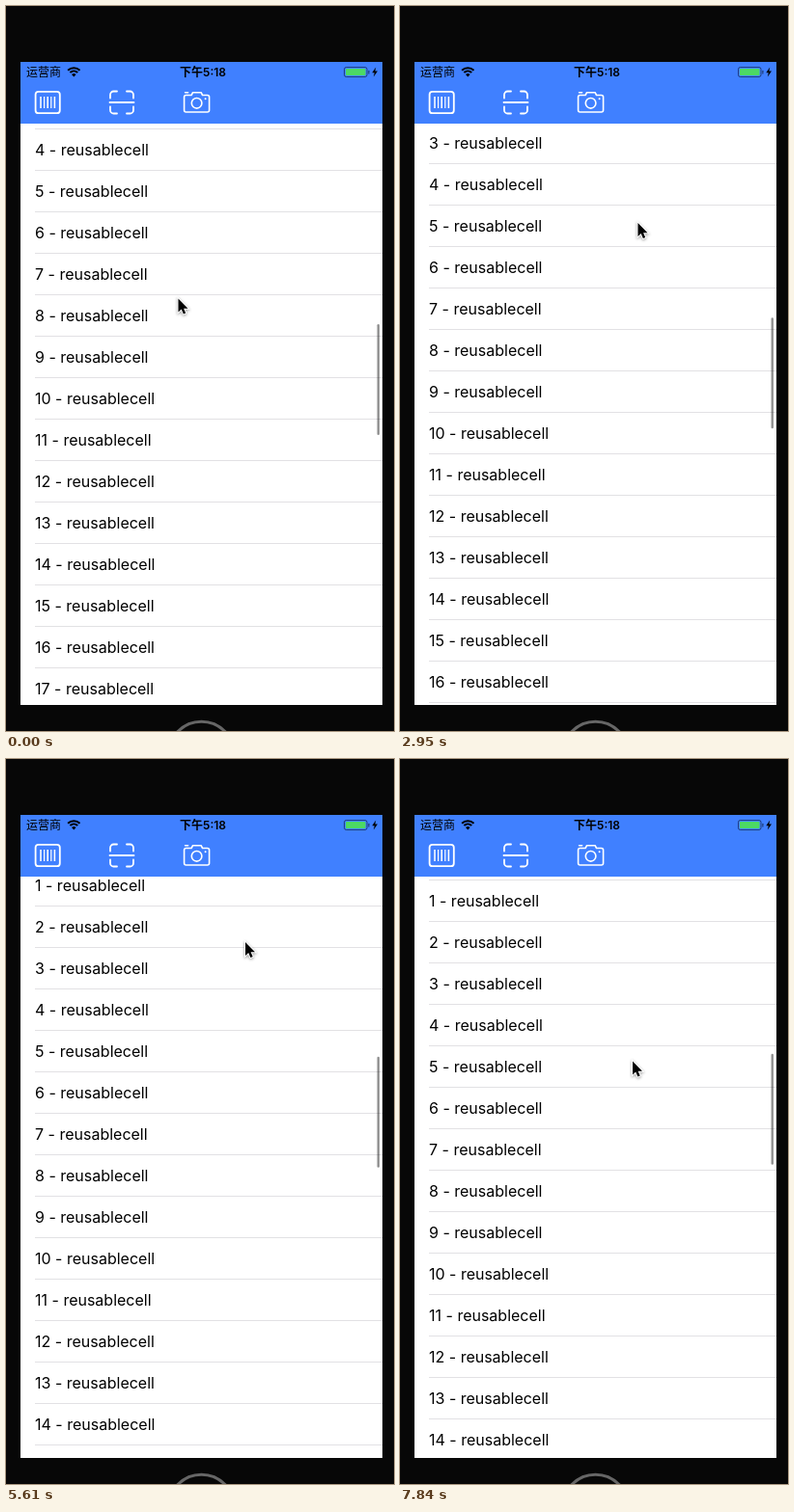
Write an HTML page with a canvas that moves like this. It is 402 px wide and 752 px high and loops after 7990 ms.

```html
<!DOCTYPE html>
<html lang="zh">
<head>
<meta charset="utf-8">
<title>Collapsing header</title>
<style>
html, body { margin: 0; width: 100%; height: 100%; overflow: hidden; background: #070707; }
canvas { display: block; width: 402px; height: 752px; }
</style>
</head>
<body>
<canvas id="stage"></canvas>
<script>
const W = 402, H = 752, LOOP = 7990;
const LEFT = 15, RIGHT = 390, TOP = 58, BOTTOM = 725;
const WIDTH = RIGHT - LEFT, NAV = 122, HEADER = 217, ROW = 43;
const BLUE = '#4080ff';
const CJK = '"Noto Sans CJK SC", "Noto Sans CJK", sans-serif';
const LATIN = 'Inter, sans-serif';

// step, scroll offset, pointer x, pointer y
const KEYS = [
  [0, 261, 178.5, 303.5], [4, 76, 204, 328], [7, 95, 218.5, 338],
  [9, 95, 218.5, 338], [10, 36, 217.5, 405], [11, 36, 217.5, 405],
  [13, 0, 216.5, 486], [14, 0, 216.5, 488], [20, 225.5, 246.5, 225],
  [22, 288, 250, 165], [27, 112, 257, 342], [30, 0, 260, 420],
  [33, 0, 258, 309], [34, 0, 258, 309], [38, 150, 248, 190],
  [40, 165, 245, 192], [44, 42.5, 243.3, 351], [46, 0, 242, 425],
  [48, 0, 242, 444], [53, 134.5, 241, 313.5]
];
// steps between which the scrollbar stays hidden
const RESTS = [[7, 9], [14, 14], [33, 34], [48, 48]];

const canvas = document.getElementById('stage');
const dpr = window.devicePixelRatio || 1;
canvas.width = W * dpr;
canvas.height = H * dpr;
const g = canvas.getContext('2d');
const clamp = v => Math.max(0, Math.min(1, v));

function stepAt(t) {
  return Math.min(53, Math.floor((t + 11) / (147 + t * .000116)));
}

function poseAt(step) {
  let i = 1;
  while (i < KEYS.length - 1 && KEYS[i][0] < step) i++;
  const a = KEYS[i - 1], b = KEYS[i];
  const k = clamp((step - a[0]) / (b[0] - a[0]));
  const [, scroll, x, y] = a.map((v, n) => v + (b[n] - v) * k);
  const bar = RESTS.reduce((v, [from, to]) =>
    step > to ? v : Math.min(v, clamp((from - step) * .45)), 1);
  return { scroll, x, y, bar };
}

function rect(x, y, w, h, color) {
  g.fillStyle = color;
  g.fillRect(x, y, w, h);
}

function text(str, x, y, font, color, align = 'left') {
  g.font = font;
  g.fillStyle = color;
  g.textAlign = align;
  g.fillText(str, x, y);
}

function path(...pts) {
  g.beginPath();
  for (let i = 0; i < pts.length; i += 2) g.lineTo(pts[i], pts[i + 1]);
}

function line(...pts) {
  path(...pts);
  g.stroke();
}

function box(x, y, w, h, r, fill) {
  g.beginPath();
  g.roundRect(x, y, w, h, r);
  fill ? g.fill() : g.stroke();
}

function ring(x, y, r, from = 0, to = Math.PI * 2) {
  g.beginPath();
  g.arc(x, y, r, from, to);
  g.stroke();
}

function dot(x, y, r) {
  g.beginPath();
  g.arc(x, y, r, 0, Math.PI * 2);
  g.fill();
}

function clipped(y, h, draw) {
  if (h <= 0) return;
  g.save();
  g.beginPath();
  g.rect(LEFT, y, WIDTH, h);
  g.clip();
  draw();
  g.restore();
}

function at(x, y, draw) {
  g.save();
  g.translate(x, y);
  draw();
  g.restore();
}

function whitePen(width) {
  g.strokeStyle = g.fillStyle = '#fff';
  g.lineWidth = width;
  g.lineCap = g.lineJoin = 'round';
}

function scanIcon(w, h, arm, r, pen) {
  whitePen(pen);
  for (const sx of [-1, 1]) for (const sy of [-1, 1]) {
    g.beginPath();
    g.moveTo(sx * w, sy * (h - arm));
    g.arcTo(sx * w, sy * h, sx * (w - arm), sy * h, r);
    g.lineTo(sx * (w - arm), sy * h);
    g.stroke();
  }
  line(-w - .5, 0, w + .5, 0);
}

function barcodeIcon(w, h, r, pen, gap, bar) {
  whitePen(pen);
  box(-w, -h, w * 2, h * 2, r);
  g.lineCap = 'butt';
  for (let i = -2; i <= 2; i++) {
    g.lineWidth = pen * (i % 2 ? .65 : .85);
    line(i * gap, -bar, i * gap, bar);
  }
}

function cameraIcon() {
  const w = 13, top = -7.5, low = 10, r = 2;
  whitePen(1.6);
  path(-w + r, top, -5.5, top, -4, -10.3, 4.5, -10.3, 6, top);
  g.arcTo(w, top, w, low, r);
  g.arcTo(w, low, -w, low, r);
  g.arcTo(-w, low, -w, top, r);
  g.arcTo(-w, top, w, top, r);
  g.closePath();
  g.stroke();
  ring(0, .8, 5.3);
  line(-12, -10.3, -9, -10.3);
  dot(9, -3.7, 1);
}

function cardIcon() {
  whitePen(2.2);
  box(-17, -16, 34, 32, 3.5);
  line(-17, -6.2, 17, -6.2);
  line(-17, 2.5, -6, 2.5, -3.5, 5.5, 3.5, 5.5, 6, 2.5, 17, 2.5);
}

function locateIcon() {
  whitePen(2.3);
  ring(0, 0, 16.3, Math.PI * 1.22, Math.PI * 2.83);
  ring(-.5, .3, 6.3);
  dot(-15.6, .2, 2.4);
}

function billIcon() {
  whitePen(1.6);
  box(31, 89, 18, 18, 1.5);
  for (let i = 0; i < 3; i++) line(34.5, 94 + i * 4, i < 2 ? 45.5 : 41, 94 + i * 4);
}

function wifi() {
  const up = -Math.PI / 2, spread = .76;
  g.strokeStyle = g.fillStyle = '#000';
  g.lineCap = 'butt';
  g.lineWidth = 2;
  for (const r of [9, 5.7]) ring(70.3, 73.2, r, up - spread, up + spread);
  path(70.3, 73.6);
  g.arc(70.3, 73.4, 3.3, up - spread, up + spread);
  g.fill();
}

function battery() {
  g.strokeStyle = g.fillStyle = 'rgba(0,0,0,.5)';
  g.lineWidth = 1;
  box(350.5, 63.5, 23.5, 10, 2);
  box(375.2, 66.7, 1.3, 3.8, .6, true);
  g.fillStyle = '#4cd964';
  box(352, 65, 20.5, 7, .8, true);
  g.fillStyle = '#000';
  path(383.2, 63.5, 379.3, 69.2, 381.8, 69.2, 380.8, 73.5, 385, 67.6, 382.4, 67.6);
  g.fill();
}

function navBar(scroll) {
  rect(LEFT, TOP, WIDTH, NAV - TOP, BLUE);
  text('运营商', 21, 72.7, '12px ' + CJK, '#000');
  text('下午5:18', 204, 72.7, '600 12px Inter, ' + CJK, '#000', 'center');
  wifi();
  battery();
  g.globalAlpha = clamp(1 - scroll / 19);
  billIcon();
  text('账单', 55, 102.7, '13px ' + CJK, '#fff');
  g.globalAlpha = clamp(scroll / 19 - 1);
  at(43.2, 100, () => barcodeIcon(12.6, 11.2, 3, 1.8, 3.6, 6));
  at(120, 100, () => scanIcon(12, 11.5, 7, 3.5, 1.8));
  at(197.6, 100, cameraIcon);
  g.globalAlpha = 1;
}

function functionPanel(scroll) {
  const height = HEADER - scroll - NAV;
  const icons = [
    () => scanIcon(16.5, 16.2, 9.5, 4.5, 2.4),
    () => barcodeIcon(16.9, 15.9, 4, 2.3, 4.1, 7.6),
    cardIcon, locateIcon
  ];
  clipped(NAV, height, () => {
    rect(LEFT, NAV, WIDTH, height, BLUE);
    g.translate(0, -scroll / 2);
    ['扫一扫', '付款', '卡券', '到位'].forEach((label, i) => {
      const x = 61.9 + i * WIDTH / 4;
      at(x, 157, icons[i]);
      text(label, x + (i ? 3.4 : 0), 199.7, '14px ' + CJK, '#f4f8ff', 'center');
    });
  });
}

function table(scroll) {
  clipped(NAV, BOTTOM - NAV, () => {
    for (let n = 0; n < 24; n++) {
      const top = HEADER + n * ROW - scroll;
      if (top > BOTTOM || top + ROW < NAV) continue;
      text(n + ' - reusablecell', 30, top + 27, '16px ' + LATIN, '#000');
      rect(30, top + ROW - .5, RIGHT - 30, .5, '#c4c3c8');
    }
  });
}

function scrollbar(scroll, alpha) {
  g.globalAlpha = alpha;
  g.fillStyle = 'rgba(0,0,0,.42)';
  box(384.5, 280 + scroll * .192, 2.5, 115, 1.25, true);
  g.globalAlpha = 1;
}

function pointer(x, y) {
  at(x, y, () => {
    path(0, 0, 0, 14, 3.2, 11, 5.4, 16, 7.7, 15, 5.6, 10.2, 10, 10.2);
    g.closePath();
    g.lineJoin = 'miter';
    g.strokeStyle = '#fff';
    g.lineWidth = 2;
    g.shadowColor = 'rgba(0,0,0,.4)';
    g.shadowBlur = 3 * dpr;
    g.shadowOffsetY = dpr;
    g.stroke();
    g.shadowColor = 'transparent';
    g.fillStyle = '#000';
    g.fill();
  });
}

function render(t) {
  const { scroll, x, y, bar } = poseAt(stepAt(t));
  g.setTransform(dpr, 0, 0, dpr, 0, 0);
  rect(0, 0, W, H, '#070707');
  g.strokeStyle = '#666';
  g.lineWidth = 3;
  ring(202.5, 776.5, 34.2);
  rect(LEFT, TOP, WIDTH, BOTTOM - TOP, '#fff');
  table(scroll);
  functionPanel(scroll);
  navBar(scroll);
  scrollbar(scroll, bar);
  pointer(x, y);
}

const start = performance.now();
function tick() {
  render((performance.now() - start) % LOOP);
  requestAnimationFrame(tick);
}
tick();
</script>
</body>
</html>
```
